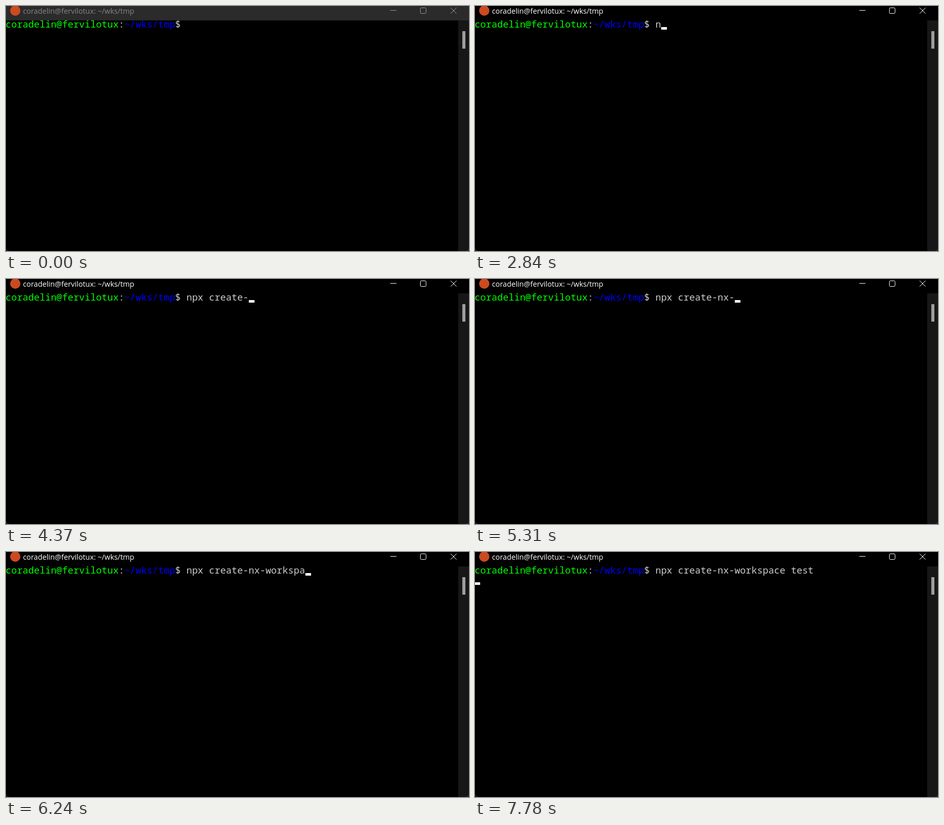
An HTML page with a canvas that plays this animation: 900x477 px, repeating every 8000 ms.

```html
<!DOCTYPE html>
<html lang="en">
<head>
<meta charset="utf-8">
<title>Terminal</title>
<style>
html, body { margin: 0; width: 100%; height: 100%; overflow: hidden; background: #000; }
canvas { display: block; }
</style>
</head>
<body>
<canvas id="stage" width="900" height="477"></canvas>
<script>
const ctx = document.getElementById('stage').getContext('2d', { alpha: false });
const W = 900, H = 477, LOOP = 8000;
const CELL = 10.98, LEFT = -0.7, BASE = 42;
const MONO = '18.3px "Noto Sans Mono", "DejaVu Sans Mono", monospace';
const SANS = '14.3px "Open Sans", "Noto Sans", sans-serif';

const USER = 'coradelin@fervilotux', DIR = '~/wks/tmp';
const COMMAND = 'npx create-nx-workspace test';
const DIR_COL = USER.length + 1;
const END_COL = DIR_COL + DIR.length;
const START_COL = END_COL + 2;
const FOCUS = 1380, BLINK_ON = 1910, BLINK_OFF = 2440, ENTER = 7780;

// Time at which each character of the command appears
const KEYS = [
  2840, 3040, 3140, 3240,
  3570, 3770, 3920, 4040, 4150, 4260, 4370,
  4640, 4710, 5310,
  5510, 5600, 5690, 5780, 5980, 6130, 6240, 6720, 6920, 6990,
  7170, 7320, 7450, 7650
];

function rect(x, y, w, h, color) {
  ctx.fillStyle = color;
  ctx.fillRect(x, y, w, h);
}

function cells(text, col, color) {
  ctx.font = MONO;
  ctx.fillStyle = color;
  [...text].forEach((ch, i) => ctx.fillText(ch, LEFT + (col + i) * CELL, BASE));
}

function titleBar(active) {
  const ink = active ? '#fff' : '#9a9a9a';
  rect(0, 0, W, 28, active ? '#000' : '#2b2b2b');

  ctx.fillStyle = '#cb4a20';
  ctx.beginPath();
  ctx.arc(18, 9, 10, 0, Math.PI * 2);
  ctx.fill();

  ctx.font = SANS;
  ctx.fillStyle = active ? '#fff' : '#868686';
  ctx.fillText(USER + ': ' + DIR, 33, 15);

  rect(747, 8, 12, 1, ink);
  ctx.strokeStyle = ink;
  ctx.lineWidth = 1;
  ctx.beginPath();
  ctx.roundRect(805.5, 3.5, 11, 11, 2);
  ctx.moveTo(864.3, 3.3);
  ctx.lineTo(875.7, 14.7);
  ctx.moveTo(875.7, 3.3);
  ctx.lineTo(864.3, 14.7);
  ctx.stroke();
}

function corners() {
  ctx.strokeStyle = '#3c3c3c';
  ctx.lineWidth = 1;
  ctx.beginPath();
  ctx.moveTo(0, H - 5);
  ctx.quadraticCurveTo(0.5, H - 0.5, 5, H - 0.5);
  ctx.moveTo(W - 5, H - 0.5);
  ctx.quadraticCurveTo(W - 0.5, H - 0.5, W, H - 5);
  ctx.stroke();
}

function cursor(t, typed) {
  if (t >= ENTER) {
    rect(0, 59, 10, 5, '#fff');
  } else if (typed || (t >= BLINK_ON && t < BLINK_OFF)) {
    rect(Math.round((START_COL + typed) * CELL), 41, 11, 5, '#fff');
  }
}

function draw(t) {
  const typed = KEYS.filter(k => k <= t).length;

  rect(0, 0, W, H, '#000');
  titleBar(t >= FOCUS);
  rect(879, 28, 21, H - 28, '#171717');
  rect(887, 49, 6, 34, '#9d9d9d');

  cells(USER, 0, '#0f0');
  cells(':', USER.length, '#ccc');
  cells(DIR, DIR_COL, '#00f');
  cells('$', END_COL, '#ccc');
  cells(COMMAND.slice(0, typed), START_COL, '#ccc');
  cursor(t, typed);
  corners();
}

const begin = performance.now();
function tick() {
  draw((performance.now() - begin) % LOOP);
  requestAnimationFrame(tick);
}
tick();
</script>
</body>
</html>
```
